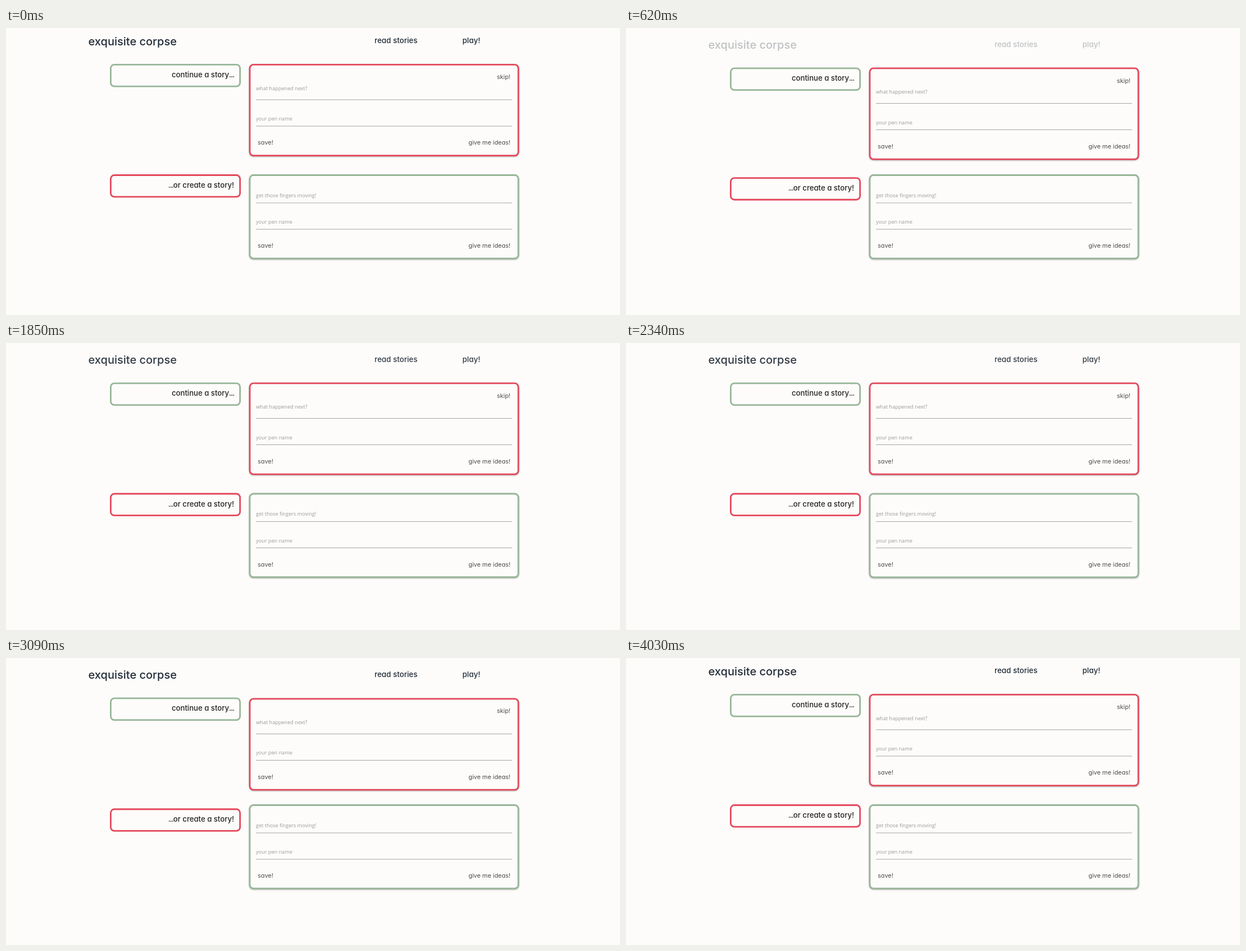
An HTML page for the animation above (4270 ms loop, 1093 by 512 pixels).

```html
<!DOCTYPE html>
<html lang="en">
<head>
<meta charset="utf-8">
<title>story game</title>
<style>
  html, body { margin: 0; width: 100%; height: 100%; overflow: hidden; background: #fdfcfa; }
  svg { display: block; width: 100%; height: 100%; }
  text { font-family: Inter, sans-serif; font-feature-settings: "cv11"; }
  rect { fill: #fdfcfa; stroke-width: 2.8; }
  line { stroke: #a4a4a4; }
  .red { stroke: #e4485b; }
  .green { stroke: #97b698; }
  .card { filter: drop-shadow(0 1px 1.2px rgba(0, 0, 0, .32)); }
  .logo { font-size: 20px; font-weight: 500; fill: #212c38; }
  .link { font-size: 13.4px; font-weight: 500; fill: #212c38; }
  .label { font-size: 13.15px; font-weight: 500; fill: #222; text-anchor: end; }
  .dots { letter-spacing: -1px; }
  .button { font-size: 10.9px; fill: #4c4c4c; }
  .right { text-anchor: end; }
  .hint { font: 9.15px "Open Sans", "Noto Sans", sans-serif; fill: #9a9a9a; }
</style>
</head>
<body>
<svg viewBox="0 0 1093 512">
  <g id="nav">
    <text class="logo" x="146.5" y="30.8">exquisite corpse</text>
    <text class="link" x="656" y="27">read stories</text>
    <text class="link" x="812.5" y="27">play!</text>
  </g>
  <g id="label1">
    <rect class="green" x="186.4" y="65.4" width="230.2" height="38.7" rx="6.5"/>
    <text class="label" x="406" y="87.7">continue a story<tspan class="dots">...</tspan></text>
  </g>
  <g id="card1">
    <rect class="red card" x="434" y="65.4" width="478" height="162.2" rx="6.5"/>
    <text class="button right" x="898" y="91">skip!</text>
    <text class="hint" x="445" y="110.7">what happened next?</text>
    <line x1="445" x2="901" y1="128" y2="128"/>
    <text class="hint" x="445" y="165">your pen name</text>
    <line x1="445" x2="901" y1="175" y2="175"/>
    <text class="button" x="448" y="208.3">save!</text>
    <text class="button right" x="898" y="208.3">give me ideas!</text>
  </g>
  <g id="label2">
    <rect class="red" x="186.4" y="262.5" width="230.2" height="38.7" rx="6.5"/>
    <text class="label" x="406" y="285"><tspan class="dots">...</tspan>or create a story!</text>
  </g>
  <g id="card2">
    <rect class="green card" x="434" y="262.5" width="478" height="148.7" rx="6.5"/>
    <text class="hint" x="445" y="301.8">get those fingers moving!</text>
    <line x1="445" x2="901" y1="312" y2="312"/>
    <text class="hint" x="445" y="349">your pen name</text>
    <line x1="445" x2="901" y1="359" y2="359"/>
    <text class="button" x="448" y="392.2">save!</text>
    <text class="button right" x="898" y="392.2">give me ideas!</text>
  </g>
</svg>
<script>
const LOOP = 4270, SHIFT = 6.5, IN_MS = 450, OUT_MS = 600;

// Each part slides down after `enter` and is back in place at `leave`.
const parts = [
  { id: "nav", enter: 20, leave: 4010, inMs: 1 },
  { id: "label1", enter: 130, leave: 3890 },
  { id: "card1", enter: 190, leave: 3450 },
  { id: "label2", enter: 530, leave: 3340 },
  { id: "card2", enter: 940, leave: 2890 }
];
for (const part of parts) part.node = document.getElementById(part.id);

// Ease out with overshoot.
function backOut(p) {
  const q = Math.min(1, Math.max(0, p)) - 1, s = 2.2;
  return 1 + (s + 1) * q ** 3 + s * q ** 2;
}

// The menu dims at once and regains its colour in hard steps.
function menuOpacity(t) {
  if (t < 20 || t >= 2490) return 1;
  return t < 1030 ? .28 : t < 1850 ? .64 : .93;
}

const start = performance.now();

function draw(now) {
  const t = Math.max(0, now - start) % LOOP;
  for (const { node, enter, leave, inMs = IN_MS } of parts) {
    const y = SHIFT * backOut((t - enter) / inMs) * backOut((leave - t) / OUT_MS);
    node.setAttribute("transform", `translate(0 ${y})`);
  }
  parts[0].node.setAttribute("opacity", menuOpacity(t));
  requestAnimationFrame(draw);
}
draw(start);
</script>
</body>
</html>
```
